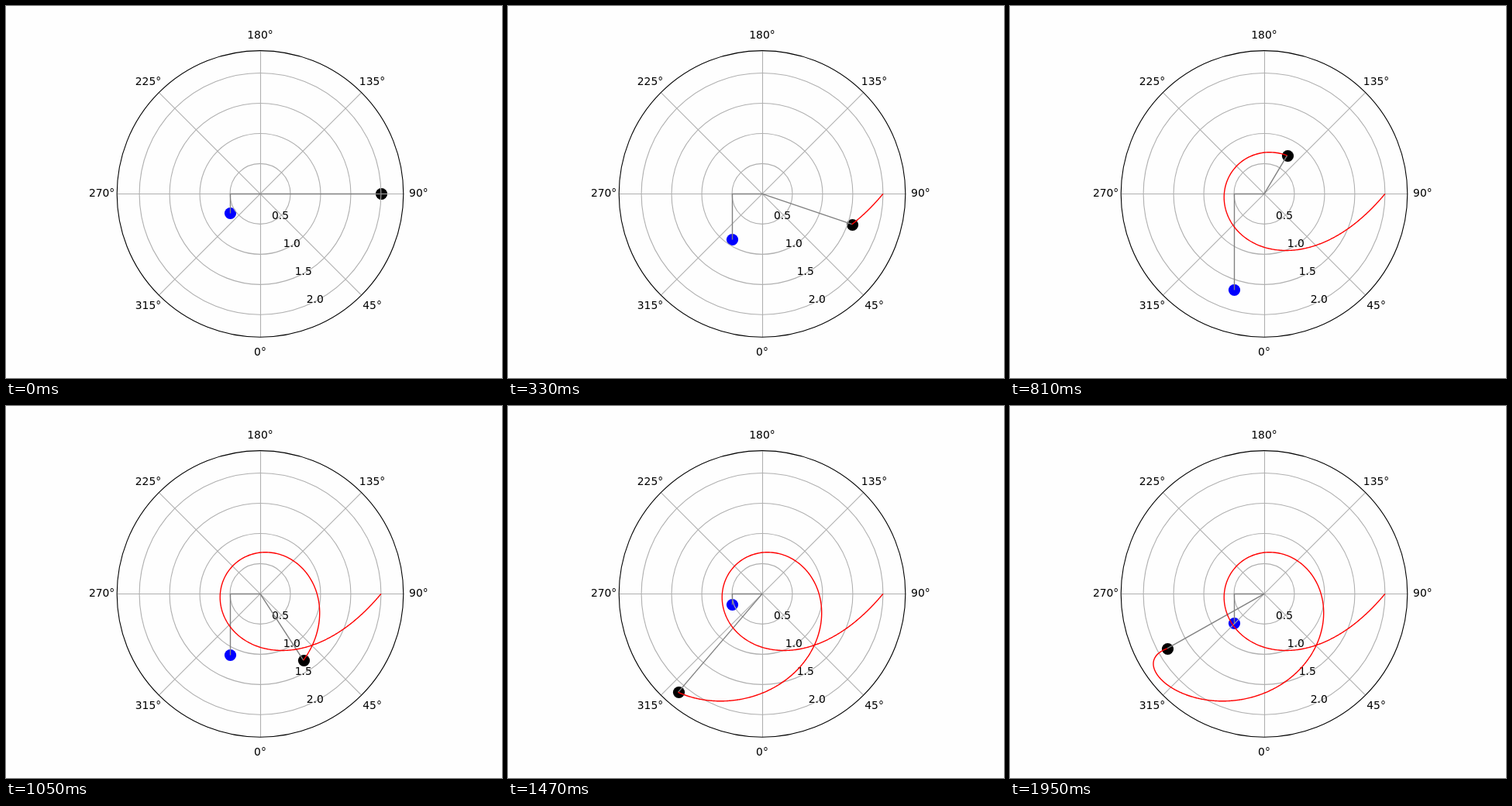
Animation, 640 px wide and 480 px high, one loop 1.98 s. Source, as an HTML page with a canvas:

```html
<!DOCTYPE html>
<html lang="en">
<head>
<meta charset="utf-8">
<title>Swinging Atwood machine</title>
<style>
  html, body { margin: 0; height: 100%; overflow: hidden; background: #fefefe; }
  canvas { display: block; }
</style>
</head>
<body>
<canvas id="stage" width="640" height="480"></canvas>
<script>
const ctx = document.getElementById('stage').getContext('2d');
const CX = 328, CY = 242.4, RIM = 184.8, UNIT = 77.95;
const FRAMES = 66, FRAME_MS = 30, SUB = 12;
const G = 9.81, MASS_RATIO = 5, ROPE = 2.32, PULLEY = 0.5;
const THIN = 1.11, LINE = 1.39;

// State: radius, radial speed, angle from straight down, angular speed
function rates([r, v, a, w]) {
  return [
    v,
    (r * w * w + G * (Math.cos(a) - MASS_RATIO)) / (1 + MASS_RATIO),
    w,
    -(2 * v * w + G * Math.sin(a)) / r
  ];
}

function rk4(s, h) {
  const shift = (k, f) => s.map((x, i) => x + k[i] * f);
  const k1 = rates(s);
  const k2 = rates(shift(k1, h / 2));
  const k3 = rates(shift(k2, h / 2));
  const k4 = rates(shift(k3, h));
  return s.map((x, i) => x + h / 6 * (k1[i] + 2 * k2[i] + 2 * k3[i] + k4[i]));
}

const polar = (r, a) => [CX + r * Math.sin(a), CY + r * Math.cos(a)];
const snap = p => p.map(x => Math.round(x) + 0.5);

// The whole swing, SUB points per frame
const path = [];
let state = [2, 0, Math.PI / 2, 0];
for (let i = 0; i <= (FRAMES - 1) * SUB; i++) {
  path.push({ r: state[0], at: polar(state[0] * UNIT, state[2]) });
  state = rk4(state, FRAME_MS / 1000 / SUB);
}

function line(points, color, width) {
  ctx.beginPath();
  points.forEach(p => ctx.lineTo(...p));
  ctx.strokeStyle = color;
  ctx.lineWidth = width;
  ctx.stroke();
}

function ring(r, color) {
  ctx.beginPath();
  ctx.arc(CX, CY, r, 0, 2 * Math.PI);
  ctx.strokeStyle = color;
  ctx.lineWidth = THIN;
  ctx.stroke();
}

function weight(p, color) {
  ctx.beginPath();
  ctx.arc(...snap(p), 7.6, 0, 2 * Math.PI);
  ctx.fillStyle = color;
  ctx.fill();
}

function label(text, [x, y], align) {
  ctx.textAlign = align;
  ctx.fillText(text, x, Math.round(y));
}

function drawGrid() {
  for (let deg = 0; deg < 180; deg += 45) {
    const a = deg * Math.PI / 180;
    const ends = [polar(RIM, a), polar(-RIM, a)];
    line(deg % 90 ? ends : ends.map(snap), '#b0b0b0', THIN);
  }
  for (let r = 0.5; r <= 2; r += 0.5) ring(r * UNIT, '#b0b0b0');

  ctx.font = '13.89px "DejaVu Sans", sans-serif';
  ctx.fillStyle = '#000';
  for (let deg = 0; deg < 360; deg += 45) {
    const [x, y] = polar(204.4, deg * Math.PI / 180);
    label(deg + '°', [x, y + 4], 'center');
  }
  for (let r = 0.5; r <= 2; r += 0.5) {
    const [x, y] = polar(r * UNIT, Math.PI / 8);
    label(r.toFixed(1), [x, y - 3], 'left');
  }
}

function draw(now) {
  const last = Math.floor(now / FRAME_MS) % FRAMES * SUB;
  const { r, at } = path[last];
  const left = CX - PULLEY * UNIT;
  const counter = [left, CY + (ROPE - r) * UNIT];

  ctx.fillStyle = '#fefefe';
  ctx.fillRect(0, 0, 640, 480);
  weight(at, '#000');
  weight(counter, '#00f');
  drawGrid();

  const bob = last ? [[CX, CY], at] : [[CX, CY], at].map(snap);
  line(bob, '#808080', LINE);
  line([[CX, CY], [left, CY], counter].map(snap), '#808080', LINE);
  if (last) line(path.slice(0, last + 1).map(p => p.at), '#f00', LINE);
  ring(RIM, '#000');
}

const start = performance.now();
function tick() {
  draw(performance.now() - start);
  requestAnimationFrame(tick);
}
tick();
</script>
</body>
</html>
```
